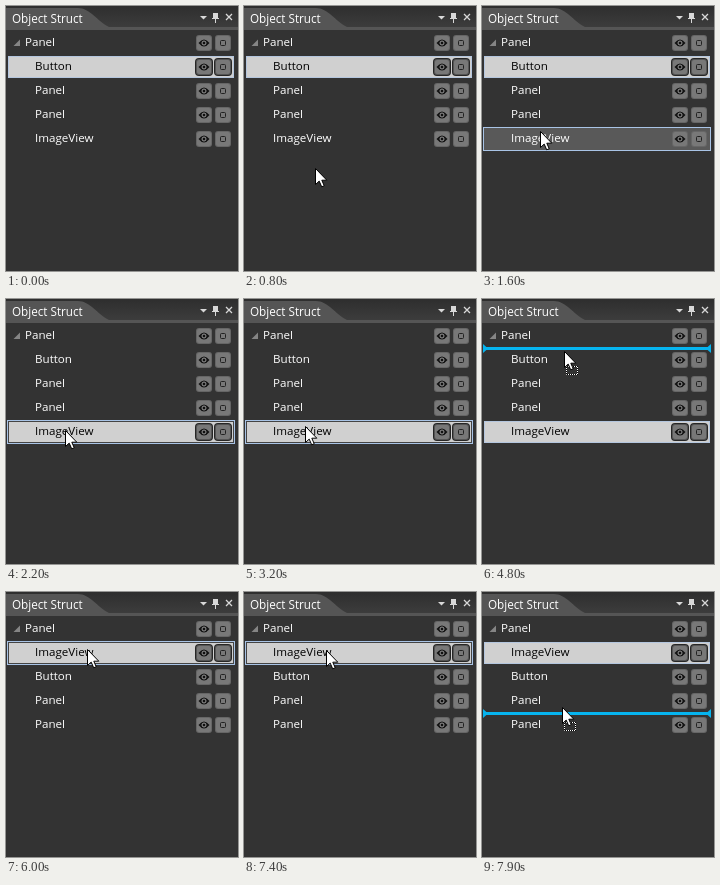
These frames come from a looping animation (232x265 px, 8000 ms). An HTML page with a canvas:

```html
<!DOCTYPE html>
<html>
<head>
<meta charset="utf-8">
<style>
html, body { margin: 0; width: 232px; height: 265px; overflow: hidden; background: #333; }
canvas { display: block; }
</style>
</head>
<body>
<canvas id="stage" width="232" height="265"></canvas>
<script>
const c = document.getElementById('stage').getContext('2d');
const LOOP = 8000, ROW = 24, TOP = 25;

// time, pointer x, y, pointer kind, insertion line (row boundary)
const KEYS = [
  [0, 0, 0, 'none'],
  [500, 78, 208, 'arrow'], [600, 76, 196, 'arrow'], [700, 74, 180, 'arrow'],
  [800, 71, 162, 'arrow'], [900, 67, 144, 'arrow'], [1000, 64, 130, 'arrow'],
  [1100, 62, 122, 'arrow'],
  [1500, 60, 123, 'arrow'], [1600, 58, 125, 'arrow'],
  [2200, 59, 131, 'arrow'], [2300, 60, 136, 'arrow'],
  [3200, 61, 127, 'arrow'],
  [3300, 65, 122, 'deny'], [3400, 69, 111, 'drag', 4], [3500, 73, 96, 'drag', 3],
  [3600, 77, 78, 'drag', 2], [3700, 80, 61, 'drag', 1], [3800, 82, 48, 'deny'],
  [4300, 82, 47, 'drag', 5], [4400, 82, 49, 'drag', 5], [4800, 82, 52, 'drag', 1],
  [5400, 81, 51, 'arrow'], [5900, 81, 54, 'arrow'], [6000, 81, 57, 'arrow'],
  [7400, 82, 58, 'arrow'], [7500, 82, 61, 'deny'], [7600, 82, 70, 'deny'],
  [7700, 81, 86, 'drag', 3], [7800, 80, 102, 'drag', 3], [7900, 80, 115, 'drag', 4]
];

function box(x, y, w, h, fill) {
  c.fillStyle = fill;
  c.fillRect(x, y, w, h);
}

function rounded(x, y, w, h, r, fill) {
  c.beginPath();
  c.roundRect(x, y, w, h, r);
  c.fillStyle = fill;
  c.fill();
}

function poly(points, fill, stroke) {
  c.beginPath();
  points.forEach(([x, y]) => c.lineTo(x, y));
  c.closePath();
  if (fill) { c.fillStyle = fill; c.fill(); }
  if (stroke) { c.strokeStyle = stroke; c.lineWidth = 1; c.stroke(); }
}

function text(s, x, y, fill, size = 11.6, weight = 400) {
  c.font = weight + ' ' + size + 'px "Open Sans", "Noto Sans", sans-serif';
  c.fillStyle = fill;
  c.fillText(s, x, y);
}

function header() {
  const g = c.createLinearGradient(0, 0, 0, 22);
  g.addColorStop(0, '#2e2e2e');
  g.addColorStop(1, '#3d3d3d');
  box(0, 0, 232, 22, g);
  c.beginPath();
  c.moveTo(0, 2);
  c.lineTo(72, 2);
  c.bezierCurveTo(84, 2, 91, 15, 103, 21);
  c.lineTo(232, 21);
  c.lineTo(232, 24);
  c.lineTo(0, 24);
  c.fillStyle = '#555';
  c.fill();
  text('Object Struct', 6, 17, '#fff', 11.7, 500);

  const ink = '#d8d8d8';
  poly([[194, 10], [201, 10], [197.5, 13.5]], ink);
  box(207, 7, 5, 6, ink);
  box(206, 12, 7, 1, ink);
  box(209, 13, 1, 4, ink);
  c.strokeStyle = ink;
  c.lineWidth = 1.3;
  c.beginPath();
  c.moveTo(220, 8); c.lineTo(226, 14);
  c.moveTo(226, 8); c.lineTo(220, 14);
  c.stroke();
}

function button(x, y, selected) {
  if (selected) rounded(x - 1, y - 1, 18, 18, 4, '#262626');
  rounded(x, y, 16, 16, 3, selected ? '#555' : '#666');
  rounded(x + 1, y + 1, 14, 14, 2, '#787878');
}

function eye(x, y) {
  c.beginPath();
  c.moveTo(x - 5.5, y);
  c.quadraticCurveTo(x, y - 7, x + 5.5, y);
  c.quadraticCurveTo(x, y + 7, x - 5.5, y);
  c.fillStyle = '#111';
  c.fill();
  c.beginPath();
  c.arc(x, y, 2, 0, 7);
  c.strokeStyle = '#999';
  c.lineWidth = 1;
  c.stroke();
}

function row(name, i, selected, hover) {
  const y = TOP + i * ROW;
  if (hover) {
    box(1, y, 228, 24, '#a9c4e6');
    box(2, y + 1, 226, 22, selected ? '#444' : '#595959');
    if (selected) box(3, y + 2, 224, 20, '#d0d0d0');
  } else if (selected) {
    box(2, y + 1, 226, 22, '#b4c6de');
    box(3, y + 2, 224, 20, '#d0d0d0');
  }
  if (!i) poly([[14, 33.5], [14, 40], [7.5, 40]], '#858585');
  text(name, i ? 29 : 19, y + 15, selected ? '#000' : '#fff', 11.6, selected ? 400 : 500);
  button(190, y + 4, selected);
  eye(198, y + 12);
  button(209, y + 4, selected);
  c.beginPath();
  c.roundRect(214.5, y + 9.5, 5, 5, 1);
  c.strokeStyle = '#222';
  c.lineWidth = 1;
  c.stroke();
}

function insertion(i) {
  const y = TOP + i * ROW + .5, blue = '#06b4ef';
  box(3, y - 1.5, 224, 3, blue);
  poly([[1, y - 4.5], [6, y], [1, y + 4.5]], blue);
  poly([[229, y - 4.5], [224, y], [229, y + 4.5]], blue);
}

function arrow(x, y) {
  const shape = [[0, 0], [0, 16], [3.7, 12.6], [6.2, 18.3], [8.7, 17.2], [6.3, 11.7], [11.3, 11.7]];
  poly(shape.map(([a, b]) => [x + a + .5, y + b + .5]), '#fff', '#000');
}

function deny(x, y) {
  for (const [color, width] of [['#fff', 4.4], ['#000', 2.4]]) {
    c.strokeStyle = color;
    c.lineWidth = width;
    c.beginPath();
    c.arc(x + .5, y + .5, 7.4, 0, 7);
    c.moveTo(x - 4.7, y - 4.7);
    c.lineTo(x + 5.7, y + 5.7);
    c.stroke();
  }
}

function dragBox(x, y) {
  c.lineWidth = 1;
  c.strokeStyle = '#000';
  c.strokeRect(x + 2.5, y + 15.5, 11, 8);
  c.setLineDash([1, 1]);
  c.lineDashOffset = .5;
  c.strokeStyle = '#fff';
  c.strokeRect(x + 2.5, y + 15.5, 11, 8);
  c.setLineDash([]);
}

function draw(t) {
  const [, x, y, kind, line] = KEYS.findLast(k => k[0] <= t);
  const moved = t >= 5400;
  const names = moved
    ? ['Panel', 'ImageView', 'Button', 'Panel', 'Panel']
    : ['Panel', 'Button', 'Panel', 'Panel', 'ImageView'];
  const selected = t < 2000 || moved ? 1 : 4;
  const hover = kind === 'arrow' ? Math.floor((y - TOP) / ROW) : -1;

  box(0, 0, 232, 265, '#333');
  header();
  names.forEach((name, i) => row(name, i, i === selected, i === hover));
  if (line) insertion(line);
  if (kind === 'drag') dragBox(x, y);
  if (kind === 'arrow' || kind === 'drag') arrow(x, y);
  if (kind === 'deny') deny(x, y);
}

const start = performance.now();
function frame() {
  draw((performance.now() - start) % LOOP);
  requestAnimationFrame(frame);
}
frame();
</script>
</body>
</html>
```
